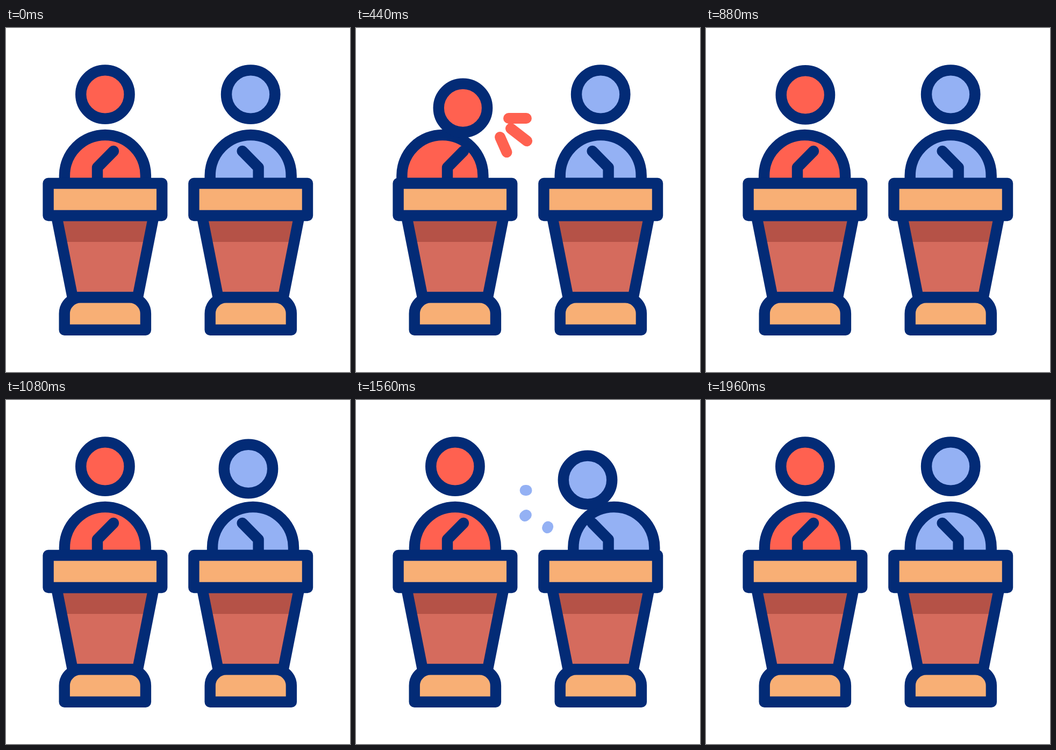
Write an HTML page that moves like this. It is 640 by 640 pixels and loops after 2000 ms.

```html
<!DOCTYPE html>
<html lang="en">
<head>
<meta charset="utf-8">
<title>Debate</title>
<style>
  html, body { margin: 0; width: 100%; height: 100%; overflow: hidden; background: #fff; }
  svg { display: block; width: 100vw; height: 100vh; }
  .ink { stroke: #032b76; stroke-width: 20.4; stroke-linecap: round; stroke-linejoin: round; }
  .wood { fill: #f8af75; }
  .panel { fill: #d56b5d; }
  .shade { fill: #b55247; }
  .ray { fill: none; stroke-width: 20; stroke-linecap: round; }
</style>
</head>
<body>
<svg id="stage" viewBox="0 0 640 640"></svg>
<script>
const LOOP = 2000, STEP = 40;

// Each speaker leans in, talks, and leans back; the right one is mirrored.
const speakers = [
  { color: '#ff6150', place: '', lean: [83, 383], back: [613, 913], talk: [340, 620],
    head: [14.5, 25.2], body: -23.5 },
  { color: '#94b1f4', place: 'translate(639.6 0) scale(-1 1)', lean: [1000, 1300], back: [1617, 1933],
    talk: [1300, 1583], head: [24.2, 25.2], body: -24.6 }
];

// Speech rays: start x, y, end x, y
const rays = [
  [284, 168, 325, 168],
  [288, 187, 325.5, 216],
  [268, 203, 283.5, 238]
];

const ease = (t, [from, to]) => {
  const u = Math.min(1, Math.max(0, (t - from) / (to - from)));
  return u * u * (3 - 2 * u);
};

const markup = ({ color, place }) => `
  <g transform="${place}">
    <path class="ink body" fill="${color}" d="M108.9 289V274.5a75.5 75.5 0 0 1 151 0V289Z"/>
    <circle class="ink head" fill="${color}" cx="184.4" cy="123.6" r="45.2"/>
    <path class="ink" fill="none" d="M200 229L170 259.5V289"/>
    <path class="panel" d="M93.8 349H275L245 501H123.8Z"/>
    <path class="shade" d="M93.8 349H275L265.3 398H103.5Z"/>
    <path class="ink" fill="none" d="M93.8 349H275L245 501H123.8Z"/>
    <path class="ink wood" d="M78.6 289H290.2V349H78.6Z"/>
    <path class="ink wood" d="M108.7 561.8V531.4a30 30 0 0 1 30-30H229.9a30 30 0 0 1 30 30V561.8Z"/>
    ${rays.map(() => `<line class="ray" stroke="${color}"/>`).join('')}
  </g>`;

const stage = document.getElementById('stage');
stage.innerHTML = speakers.map(markup).join('');
speakers.forEach((s, i) => {
  const group = stage.children[i];
  s.headEl = group.querySelector('.head');
  s.bodyEl = group.querySelector('.body');
  s.rayEls = [...group.querySelectorAll('.ray')];
});

function drawRay(el, [x1, y1, x2, y2], tail, tip) {
  const at = (a, b, u) => a + (b - a) * u;
  el.setAttribute('visibility', tip - tail > 0.001 ? 'visible' : 'hidden');
  el.setAttribute('x1', at(x1, x2, tail));
  el.setAttribute('y1', at(y1, y2, tail));
  el.setAttribute('x2', at(x1, x2, tip));
  el.setAttribute('y2', at(y1, y2, tip));
}

function draw(t) {
  for (const s of speakers) {
    const k = ease(t, s.lean) - ease(t, s.back);
    s.headEl.setAttribute('transform', `translate(${s.head[0] * k} ${s.head[1] * k})`);
    s.bodyEl.setAttribute('transform', `translate(${s.body * k} 0)`);

    const [from, to] = s.talk, mid = (from + to) / 2;
    const tip = ease(t, [from, mid]), tail = ease(t, [mid, to]);
    s.rayEls.forEach((el, i) => drawRay(el, rays[i], tail, tip));
  }
}

const began = performance.now();
function tick() {
  const t = (performance.now() - began) % LOOP;
  draw(Math.floor(t / STEP) * STEP);
  requestAnimationFrame(tick);
}
tick();
</script>
</body>
</html>
```
